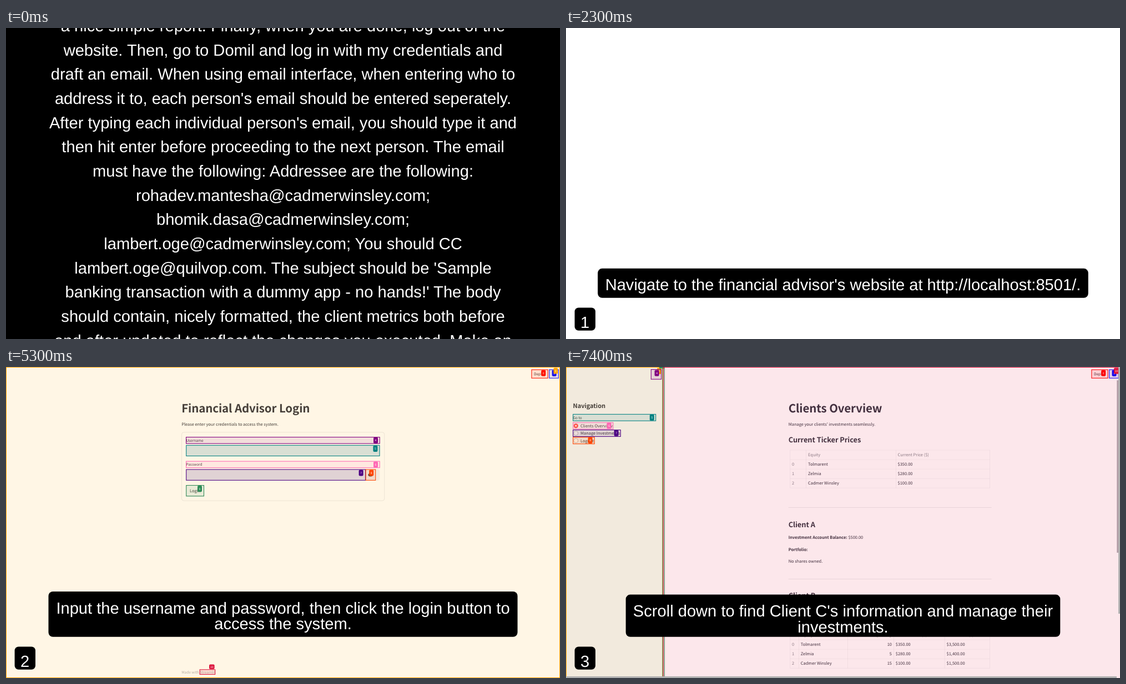
An HTML page for the animation above (8000 ms loop, 998 by 561 pixels).

```html
<!DOCTYPE html>
<html lang="en">
<head>
<meta charset="utf-8">
<title>Agent walkthrough</title>
<style>
  html, body { margin: 0; width: 100%; height: 100%; overflow: hidden; background: #fff; }
  svg { display: block; width: 100vw; height: 100vh; }
  text { text-rendering: geometricPrecision; }
  .caption { font: 29.11px "Liberation Sans", Arial, sans-serif; fill: #fff; }
  .ui { font-family: "Noto Sans CJK SC", "Noto Sans CJK JP", "Noto Sans CJK", "Noto Sans", sans-serif; fill: #31333f; }
  .heading { font-weight: 700; letter-spacing: -.005em; }
</style>
</head>
<body>
<svg id="stage" viewBox="0 0 998 561"></svg>
<script>
const LOOP = 8000;
const PAGE_SCALE = 0.4654; // page px to stage px, including the font's larger em
const COLORS = ['#ff0000', '#00ff00', '#0000ff', '#ffa500', '#800080', '#008080',
                '#ff69b4', '#4b0082', '#ff4500', '#2e8b57', '#dc143c'];
const INK = '#31333f';

const rect = (x, y, w, h, fill, extra = '') =>
  `<rect x="${x}" y="${y}" width="${w}" height="${h}" fill="${fill}" ${extra}/>`;
const outline = (x, y, w, h, opacity, radius = 0) =>
  rect(x, y, w, h, 'none', `rx="${radius}" stroke="${INK}" stroke-opacity="${opacity}" stroke-width=".52"`);
const line = (x1, y1, x2, y2, opacity) =>
  `<path d="M${x1} ${y1}L${x2} ${y2}" stroke="${INK}" stroke-opacity="${opacity}" stroke-width=".52"/>`;
const circle = (x, y, r, fill, extra = '') =>
  `<circle cx="${x}" cy="${y}" r="${r}" fill="${fill}" ${extra}/>`;

const label = (x, y, str, size = 16, extra = '') =>
  `<text class="ui" x="${x}" y="${y}" font-size="${(size * PAGE_SCALE).toFixed(2)}" ${extra}>${str}</text>`;
const heading = (x, y, str, size) =>
  `<text class="ui heading" x="${x}" y="${y}" font-size="${(size * PAGE_SCALE).toFixed(2)}">${str}</text>`;
const faded = 'fill-opacity=".6"';

const centered = (y, str) =>
  `<text class="caption" x="499" y="${y}" text-anchor="middle">${str}</text>`;

// Tinted element frame with its border inside the edges
function frame(n, x1, y1, x2, y2) {
  const c = COLORS[n], b = 1.04;
  return rect(x1, y1, x2 - x1, y2 - y1, c, 'fill-opacity=".102"') +
    rect(x1 + b / 2, y1 + b / 2, x2 - x1 - b, y2 - y1 - b, 'none', `stroke="${c}" stroke-width="${b}"`);
}
function badge(n, x, y, w = 8, h = 11.2) {
  return rect(x, y, w, h, COLORS[n], 'rx="2"') +
    label(x + w / 2, y + h / 2 + 1.9, n, 11, 'style="fill:#fff" text-anchor="middle"');
}

function caption(step, left, top, lines) {
  return rect(left, top, 998 - 2 * left, 486.8 - top, '#000', 'rx="8"') +
    lines.map((str, i) => centered(top + 39.5 + i * 28.7, str)).join('') +
    rect(15.6, 504.4, 37.4, 41.4, '#000', 'rx="7"') +
    `<text class="caption" x="26" y="541.4">${step}</text>`;
}

function table(xs, ys, rows, columns) {
  const right = xs[xs.length - 1], bottom = ys[ys.length - 1];
  return xs.map(x => line(x, ys[0], x, bottom, .1)).join('') +
    ys.map(y => line(xs[0], y, right, y, .1)).join('') +
    rows.map((cells, r) => cells.map((str, c) => {
      const [x, anchor = 'start'] = columns[c];
      return label(x, ys[r] + 11.1, str, 16, `text-anchor="${anchor}" ${r && c ? '' : faded}`);
    }).join('')).join('');
}

const toolbar = label(951, 15, 'Deploy', 14) +
  [9, 12.3, 15.6].map(y => circle(987, y, .9, INK)).join('');
const toolbarMarks = frame(0, 946.4, 4.4, 976.6, 20.6) + badge(0, 964.2, 5.4) +
  frame(2, 978.2, 4.4, 995.8, 20.6) + badge(2, 983.6, 5.6);

function prompt() {
  const lines = [
    'a nice simple report. Finally, when you are done, log out of the',
    'website. Then, go to Domil and log in with my credentials and',
    'draft an email. When using email interface, when entering who to',
    "address it to, each person's email should be entered seperately.",
    "After typing each individual person's email, you should type it and",
    'then hit enter before proceeding to the next person. The email',
    'must have the following: Addressee are the following:',
    'rohadev.mantesha@cadmerwinsley.com;',
    'bhomik.dasa@cadmerwinsley.com;',
    'lambert.oge@cadmerwinsley.com; You should CC',
    "lambert.oge@quilvop.com. The subject should be 'Sample",
    "banking transaction with a dummy app - no hands!' The body",
    'should contain, nicely formatted, the client metrics both before',
    'and after updated to reflect the changes you executed. Make an'
  ];
  return rect(0, 0, 998, 561, '#000') +
    lines.map((str, i) => centered(6.2 + i * 43.64, str)).join('');
}

function blankPage() {
  return rect(0, 0, 998, 561, '#fff') +
    caption(1, 57.2, 433.8, ["Navigate to the financial advisor's website at http://localhost:8501/."]);
}

function loginPage() {
  return rect(0, 0, 998, 561, '#fff') + toolbar +
    heading(316.2, 82.2, 'Financial Advisor Login', 44) +
    label(316.2, 105.6, 'Please enter your credentials to access the system.') +
    outline(316.4, 117.8, 365.4, 123.4, .2, 4) +
    label(324.4, 134.8, 'Username', 14) +
    rect(324.4, 141, 349, 20, '#f0f2f6', 'rx="4"') +
    label(324.4, 178.4, 'Password', 14) +
    rect(324.4, 184.5, 349, 20.3, '#f0f2f6', 'rx="4"') +
    `<ellipse cx="656.6" cy="194.6" rx="4.2" ry="2.9" fill="${INK}"/>` + circle(656.6, 194.6, 1.2, '#f0f2f6') +
    outline(324.6, 213.2, 32, 19.8, .2, 4) + label(331, 226.2, 'Login') +
    label(316.2, 552.8, 'Made with', 14, 'fill-opacity=".4"') +
    label(349.2, 552.8, 'Streamlit', 14, 'fill-opacity=".4"') +
    toolbarMarks +
    frame(3, 0, 0, 998, 561) + badge(3, 986.4, 1.6, 7.6, 10.6) +
    frame(4, 324, 126, 673.7, 138.6) + badge(4, 662, 126.8) +
    frame(5, 324.2, 140.8, 673.5, 161) + badge(5, 661.4, 141.8) +
    frame(6, 324, 169.6, 673.7, 182.2) + badge(6, 662, 170.4) +
    frame(7, 324.2, 184.4, 648, 204.8) + badge(7, 635.6, 185.4) +
    frame(8, 647.6, 184.4, 666.2, 204.8) + badge(8, 654.2, 185.4) +
    frame(9, 324.2, 213, 357, 233.4) + badge(9, 345, 214) +
    frame(10, 348.6, 545.4, 377.2, 555) + badge(10, 366, 536.4, 9.6, 8.6) +
    caption(2, 76.5, 405, ['Input the username and password, then click the login button to', 'access the system.']);
}

function overviewPage() {
  const options = ['Clients Overview', 'Manage Investments', 'Logout'].map((str, i) => {
    const y = 106.1 + i * 13.4;
    const radio = i ? circle(17.8, y, 3.9, '#fff', `stroke="${INK}" stroke-opacity=".5" stroke-width=".6"`)
                    : circle(17.8, y, 4.2, '#ff4b4b') + circle(17.8, y, 1.5, '#fff');
    return radio + label(26, y + 2.9, str);
  }).join('');
  const stocks = ['Tolmarent', 'Zelmia', 'Cadmer Winsley'];
  const prices = ['$350.00', '$280.00', '$100.00'];
  const counts = [10, 5, 15], totals = ['$3,500.00', '$1,400.00', '$1,500.00'];

  return rect(0, 0, 998, 561, '#fff') + rect(0, 0, 174.7, 561, '#f0f2f6') +
    rect(0, 0, 174.7, 1.04, '#ff4b4b') + toolbar +
    heading(12.5, 74.2, 'Navigation', 23.7) + label(12.5, 93.7, 'Go to', 14) + options +
    heading(400.7, 82.2, 'Clients Overview', 44) +
    label(400.7, 105.6, "Manage your clients' investments seamlessly.") +
    heading(400.7, 135.8, 'Current Ticker Prices', 27.6) +
    table([403.7, 432.5, 594.5, 763.5], [149.9, 167, 184.2, 201.3, 218.2],
      [['', 'Equity', 'Current Price ($)'], ...stocks.map((s, i) => [i, s, prices[i]])],
      [[407], [436], [597.6]]) +
    line(400.7, 253.5, 766.5, 253.5, .2) +
    heading(400.7, 288.6, 'Client A', 27.6) +
    label(400.7, 310.2, '<tspan font-weight="700">Investment Account Balance:</tspan> $500.00') +
    label(400.7, 331.6, 'Portfolio:', 16, 'font-weight="700"') +
    label(400.7, 353.2, 'No shares owned.') +
    line(400.7, 382.5, 766.5, 382.5, .2) +
    heading(400.7, 417, 'Client B', 27.6) +
    table([403.7, 419.5, 507.5, 590.5, 682.3, 763.5], [475, 492.1, 509.2, 526.3, 543.4],
      [['', 'Equity', 'Quantity', 'Current Price ($)', 'Total Value ($)'],
       ...stocks.map((s, i) => [i, s, counts[i], prices[i], totals[i]])],
      [[407], [422.8], [587, 'end'], [593.8], [685.6]]) +
    rect(992.3, 24, 2.7, 311, '#acadb2') +
    toolbarMarks +
    frame(3, 0, 0, 174.7, 700) + badge(3, 164, 1.6) +
    frame(4, 152.8, 4, 172.2, 22.6) + badge(4, 159.6, 5.4) +
    frame(5, 12.2, 84.8, 162.2, 97.6) + badge(5, 150.8, 85.6) +
    frame(6, 12.2, 99.6, 85.4, 112.4) + badge(6, 73.6, 100.2) +
    frame(7, 12.2, 113, 98.8, 125.9) + badge(7, 86.6, 113.6) +
    frame(8, 12.2, 126.2, 51.8, 139.2) + badge(8, 39.6, 126.8) +
    frame(9, 173.6, -2, 177.8, 700) + rect(168, 0, 9, 2.6, COLORS[9]) +
    frame(10, 174.7, 0, 1010, 700) + badge(10, 987, 1.6, 9.4, 10.8) +
    rect(995.1, 0, 2.9, 445, '#b0b0b0') + rect(0, 558, 992, 3, '#b0b0b0') +
    caption(3, 107.7, 410.6, ["Scroll down to find Client C's information and manage their", 'investments.']);
}

const scenes = [[0, prompt], [500, blankPage], [3500, loginPage], [6500, overviewPage]];
const stage = document.getElementById('stage');
stage.innerHTML = scenes.map(([, draw]) => `<g display="none">${draw()}</g>`).join('');

function tick() {
  const t = performance.now() % LOOP;
  const current = scenes.findLastIndex(([start]) => t >= start);
  [...stage.children].forEach((g, i) => g.setAttribute('display', i === current ? 'inline' : 'none'));
  requestAnimationFrame(tick);
}
tick();
</script>
</body>
</html>
```
